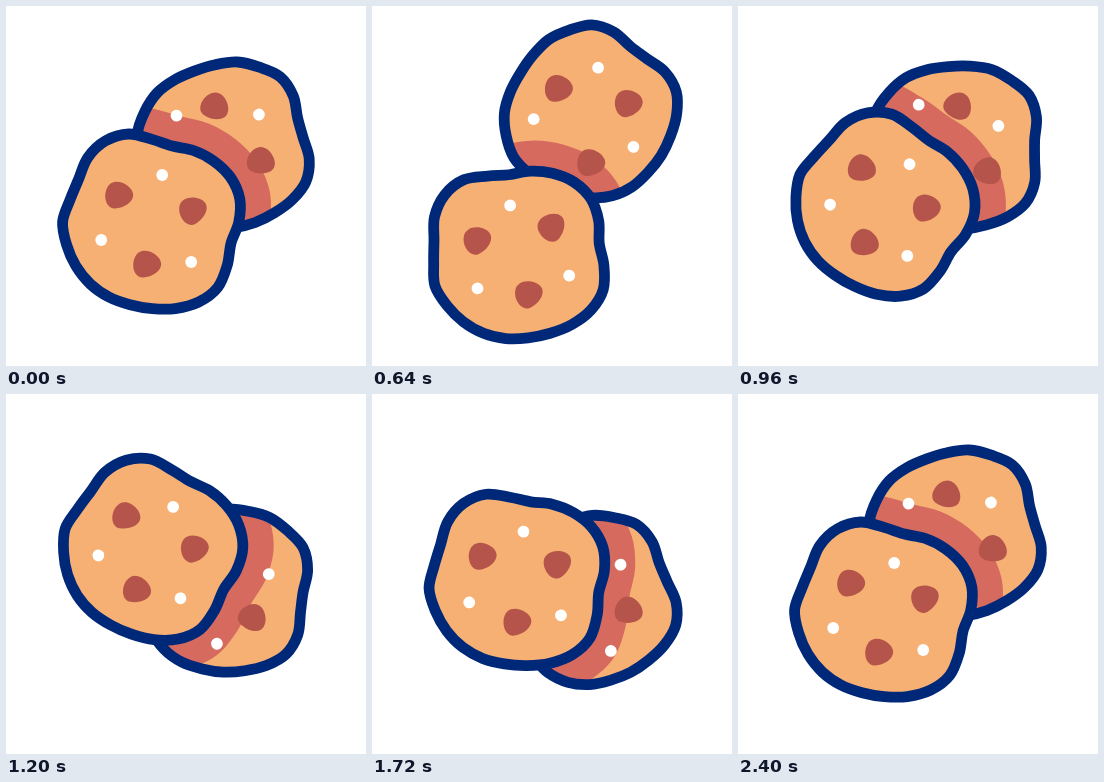
Animation, 360 px wide and 360 px high, one loop 2600 ms. Source, as an HTML page:

```html
<!DOCTYPE html>
<html lang="en">
<head>
<meta charset="utf-8">
<title>Cookies</title>
<style>
  html, body { margin: 0; width: 100%; height: 100%; overflow: hidden; background: #fff; }
  svg { display: block; width: 100vw; height: 100vh; }
  .dough { fill: #f6b074; }
  .edge { fill: none; stroke: #002878; stroke-width: 10.8; stroke-linejoin: round; }
  .chip { fill: #b5544a; }
  .sugar { fill: #fff; }
  .shade { fill: #d66a5f; }
</style>
</head>
<body>
<svg viewBox="0 0 360 360">
  <defs>
    <clipPath id="clip"><path id="clipShape"/></clipPath>
    <path id="blob" d="M-5-13C2-15 14-8 14 0C14 7 5 13-4 13.5C-10 14-14 8-14 1C-14-5-11-12-5-13Z"/>
  </defs>
  <g id="backBody"></g>
  <g clip-path="url(#clip)"><path id="shade" class="shade"/></g>
  <g id="backTop"></g>
  <g id="front"></g>
</svg>
<script>
const LOOP = 2600, STEP = 40;
const el = id => document.getElementById(id);

// Outer radius of each cookie every 15 degrees, clockwise from the right
const frontRadii = [92, 87, 92, 98, 98, 95, 92, 91, 92, 93, 93.5, 94,
  95, 90.5, 90.5, 96.5, 99, 96.5, 88, 84, 88, 92, 95.5, 96];
const backRadii = [91, 88, 87, 87, 89, 90, 89, 86, 87, 91, 94, 93,
  92, 89, 87, 88, 91, 92, 94.5, 90.5, 83.5, 84, 90.5, 93.5];

// Smooth closed curve through the radii, grown by a fixed amount
function outline(radii, grow) {
  const n = radii.length;
  const pts = radii.map((r, i) => {
    const a = i * 2 * Math.PI / n;
    return [(r + grow) * Math.cos(a), (r + grow) * Math.sin(a)];
  });
  const at = i => pts[(i + n) % n];
  const fmt = p => p.map(v => v.toFixed(2)).join(' ');
  let d = 'M' + fmt(pts[0]);
  for (let i = 0; i < n; i++) {
    const [p, q, r, s] = [at(i - 1), at(i), at(i + 1), at(i + 2)];
    const c1 = q.map((v, k) => v + (r[k] - p[k]) / 6);
    const c2 = r.map((v, k) => v - (s[k] - q[k]) / 6);
    d += 'C' + [c1, c2, r].map(fmt).join(' ');
  }
  return d + 'Z';
}

const path = (cls, d) => `<path class="${cls}" d="${d}"/>`;
const toppings = (chips, sugar) =>
  chips.map(([x, y, a]) =>
    `<use href="#blob" class="chip" transform="translate(${x} ${y}) rotate(${a})"/>`).join('') +
  sugar.map(([x, y]) => `<circle class="sugar" cx="${x}" cy="${y}" r="5.9"/>`).join('');

const frontShape = outline(frontRadii, -5.4);
const backShape = outline(backRadii, -5.4);

el('front').innerHTML = path('dough', frontShape) +
  toppings([[-33, -27, 0], [41, -12, -25], [-5, 42, 0]],
           [[10, -47], [-51, 18], [39, 40]]) +
  path('edge', frontShape);
el('backBody').innerHTML = path('dough', backShape);
el('backTop').innerHTML =
  toppings([[-32.3, -25.3, 0], [37.7, -11.3, -10], [0.7, 48.7, 0]],
           [[6.7, -46.3], [-57.3, 5.7], [42.7, 32.7]]) +
  path('edge', backShape);
el('clipShape').setAttribute('d', backShape);
el('shade').setAttribute('d', outline(frontRadii, 25.5));

// Keys: [time, value, optional power that speeds up the start of the move]
const tracks = {
  frontY: [[15, 0], [565, 33], [1380, -72], [2000, 0]],
  frontTurn: [[0, 0], [440, -36], [1050, 23], [1480, -10.7], [2400, 0, 0.55]],
  backY: [[110, 0], [670, -33], [1500, 92], [2120, 0]],
  backTurn: [[110, 0], [580, -40], [1100, 27], [1550, -8.2], [2400, 0]]
};

function sample(keys, t) {
  if (t <= keys[0][0]) return keys[0][1];
  for (let i = 1; i < keys.length; i++) {
    const [t0, v0] = keys[i - 1], [t1, v1, power = 1] = keys[i];
    if (t < t1) {
      const u = Math.pow((t - t0) / (t1 - t0), power);
      return v0 + (v1 - v0) * (1 - Math.cos(Math.PI * u)) / 2;
    }
  }
  return keys[keys.length - 1][1];
}

function place(ids, x, y, turn) {
  const value = `translate(${x} ${y.toFixed(3)}) rotate(${turn.toFixed(3)})`;
  ids.forEach(id => el(id).setAttribute('transform', value));
}

function draw(ms) {
  const t = Math.floor((ms % LOOP) / STEP) * STEP;
  place(['front', 'shade'], 146.2, 216 + sample(tracks.frontY, t), sample(tracks.frontTurn, t));
  place(['backBody', 'backTop', 'clipShape'], 219,
    140.7 + sample(tracks.backY, t), 38.3 + sample(tracks.backTurn, t));
}

let start = null;
function tick(now) {
  if (start === null) start = now;
  draw(Math.max(0, now - start));
  requestAnimationFrame(tick);
}
draw(0);
requestAnimationFrame(tick);
</script>
</body>
</html>
```
